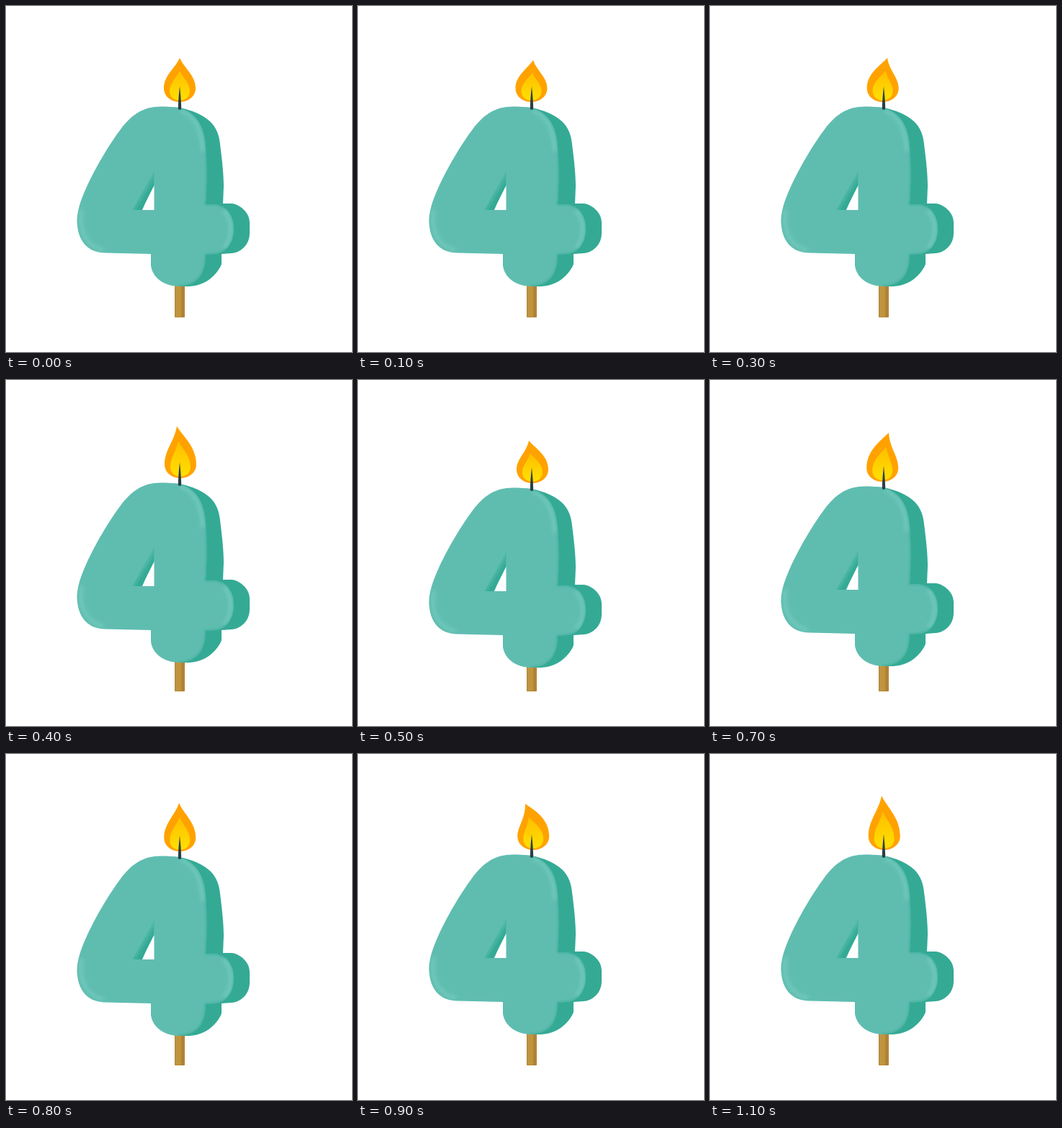
Animation of 480x480 px, one loop 1200 ms. Source, as an HTML page:

```html
<!DOCTYPE html>
<html lang="en">
<head>
<meta charset="utf-8">
<title>Birthday candle</title>
<style>
  html, body { margin: 0; width: 100%; height: 100%; overflow: hidden; background: #fff; }
  svg { display: block; width: 100vw; height: 100vh; }
</style>
</head>
<body>
<svg viewBox="0 0 480 480">
  <defs>
    <path id="face" d="M215 139.500 C190 139.500 174 151 159 171 C144 191 124 224 111 253 C103 271 98.500 285 98.500 299
      C99.500 325 112 342 138 342.500 L201 344 V360 C203 376 218 388.500 240 389 C262 388 277 376 277 345
      L290 344 C306 343 316 328 316 309 C316 290 306 276 288 275 L277 275 C279 250 279 220 277 194
      C275 164 262 147 240 141 C232 140 224 139.500 215 139.500 Z"/>
    <clipPath id="faceClip"><use href="#face"/></clipPath>
    <filter id="soft" x="-20%" y="-20%" width="140%" height="140%"><feGaussianBlur stdDeviation="1.5"/></filter>
    <filter id="softer" x="-60%" y="-20%" width="220%" height="140%"><feGaussianBlur stdDeviation="2.5"/></filter>
    <linearGradient id="holeSide" gradientUnits="userSpaceOnUse" x1="183" y1="258" x2="198" y2="267">
      <stop offset="0" stop-color="#66c4b5"/>
      <stop offset=".7" stop-color="#34aa95"/>
    </linearGradient>
    <linearGradient id="glow" x1="0" y1="0" x2="0" y2="1">
      <stop offset="0" stop-color="#ffbe00"/>
      <stop offset="1" stop-color="#ffe000"/>
    </linearGradient>
  </defs>

  <rect x="234" y="340" width="14" height="92" rx="1" fill="#b08335"/>
  <rect x="235" y="340" width="8" height="91.500" fill="#c0943f"/>

  <g id="candle">
    <path fill="#34aa95" d="M215 140 L240 141 C258 144 275 152 284 161 C292 169 296 180 297 192
      C300 215 302 235 302 250 L301 274 L313 274 C324 275 338 286 338 300 V315
      C338 331 326 342 313 343 L299 344 V358 C296 367 281 388 254 389 H240 L215 340 Z"/>
    <use href="#face" fill="#5fbdb0"/>
    <g clip-path="url(#faceClip)" fill="none" stroke-linecap="round">
      <path stroke="#45b29f" stroke-width="3" filter="url(#soft)" d="M240 141 C262 147 275 164 277 194
        C279 220 279 250 277 275 H288 C306 276 316 290 316 309 C316 328 306 343 290 344 L277 345
        C277 376 262 388 240 389"/>
      <g stroke="#74ccbf" stroke-width="4" filter="url(#softer)">
        <path d="M105 284 C100 312 112 333 134 338"/>
        <path d="M244 145 C265 154 271 174 273 200"/>
        <path d="M303 284 C315 298 315 320 304 334"/>
      </g>
    </g>
    <path d="M175 283 L206 227 L205 249 V283 Z" fill="url(#holeSide)"/>
    <path d="M189 283 C194 271 200 260 205.500 249 V283 Z" fill="#fff"/>
    <path id="outer" fill="#ffa200"/>
    <path id="inner" fill="url(#glow)"/>
    <path fill="#2b3d48" d="M241 111 C241.800 120 243 130 243.200 141 Q243.200 144 241 144
      Q238.700 144 238.800 141 C239 130 240.200 120 241 111 Z"/>
  </g>
</svg>
<script>
  const STEP = 100;
  // One row per step: candle drop, flame tip x and y relative to the candle
  const poses = [
    [0, 241, 72], [0, 243, 75], [0, 245, 76], [0, 246, 72],
    [3, 237, 61], [10, 237, 74], [13, 243, 72], [8, 248, 65],
    [2, 240, 66], [0, 232, 69], [0, 234, 63], [0, 238, 58]
  ];
  const byId = id => document.getElementById(id);
  const candle = byId('candle'), outer = byId('outer'), inner = byId('inner');

  // Teardrop whose tip leans away from its round base
  function drop(tipX, tipY, midX, midY, halfW, bottom) {
    const lean = tipX - 241;
    const height = midY - tipY;
    const round = (bottom - midY) * 0.6;
    const neckX = tipX - 0.7 * lean;
    // side is 1 for right, -1 for left
    const edge = side => ({
      neck: `${neckX + side * halfW * 0.27} ${tipY + height * 0.33 + side * 0.7 * lean}`,
      x: midX + side * halfW,
      rise: midY - height * 0.42 + side * 0.6 * lean,
      base: midX + side * halfW * 0.55
    });
    const r = edge(1), l = edge(-1);
    return `M${tipX} ${tipY}
      C${r.neck} ${r.x} ${r.rise} ${r.x} ${midY}
      C${r.x} ${midY + round} ${r.base} ${bottom} ${midX} ${bottom}
      C${l.base} ${bottom} ${l.x} ${midY + round} ${l.x} ${midY}
      C${l.x} ${l.rise} ${l.neck} ${tipX} ${tipY}Z`;
  }

  function draw(time) {
    const [dy, tipX, tipY] = poses[Math.floor(time / STEP) % poses.length];
    const lean = tipX - 241;
    const midX = 241 - 0.25 * lean;
    candle.setAttribute('transform', `translate(0 ${dy})`);
    outer.setAttribute('d', drop(tipX, tipY, midX, 114, 22, 133));
    inner.setAttribute('d', drop(241 + 0.5 * lean, 90 + 0.75 * (tipY - 72), midX, 118, 14, 131));
  }

  const start = performance.now();
  function tick() {
    draw(performance.now() - start);
    requestAnimationFrame(tick);
  }
  tick();
</script>
</body>
</html>
```
